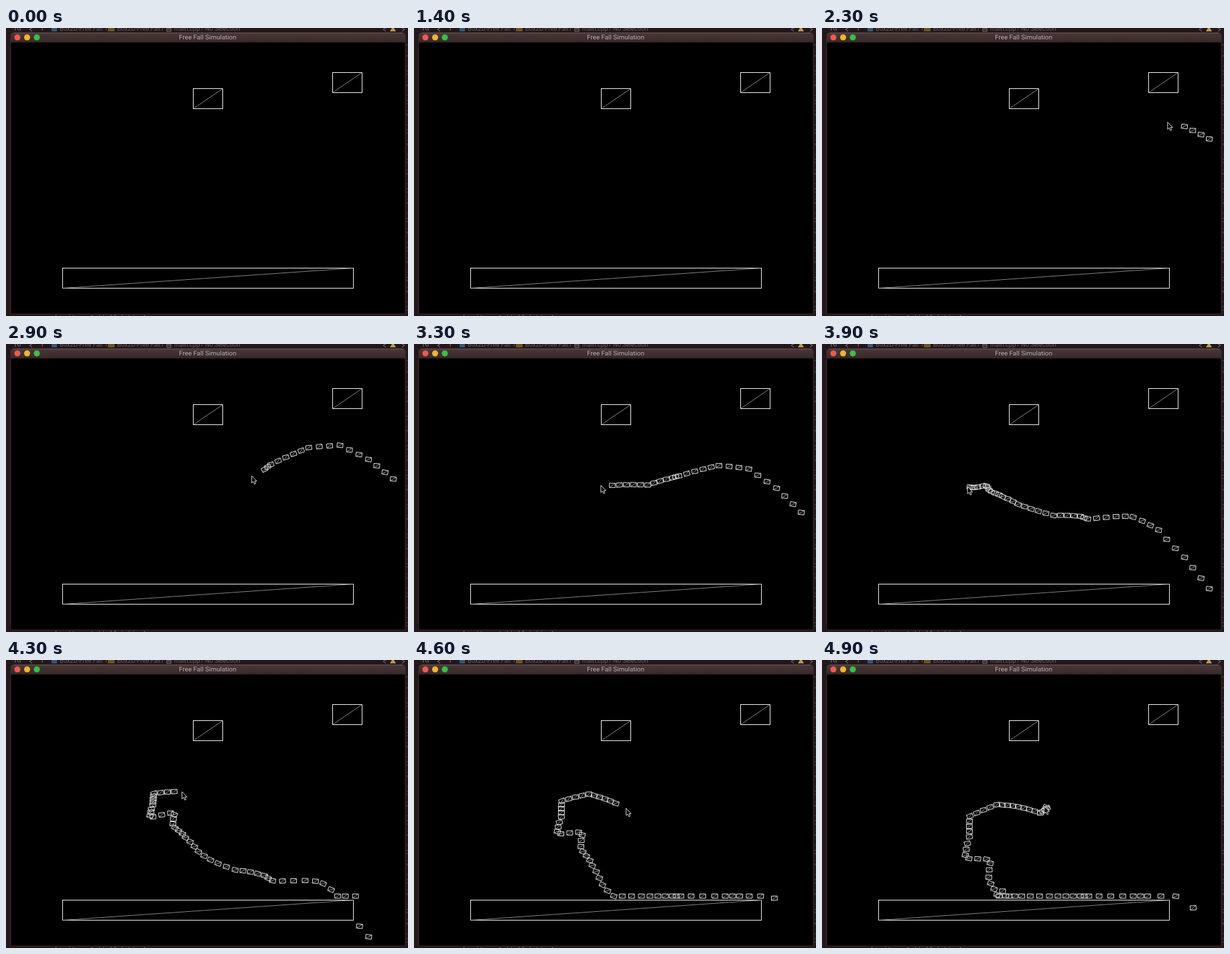
An HTML page that plays this animation: 600 px wide and 430 px high, repeating every 5000 ms.

```html
<!DOCTYPE html>
<html lang="en">
<head>
<meta charset="utf-8">
<title>Free Fall Simulation</title>
<style>
html, body { margin: 0; width: 100%; height: 100%; overflow: hidden; background: #24171a; }
svg { display: block; width: 100%; height: 100%; }
text { font-family: Roboto, Inter, sans-serif; }
.mono { font-family: "Noto Sans Mono", "DejaVu Sans Mono", monospace; }
</style>
</head>
<body>
<svg viewBox="0 0 600 430">
  <defs>
    <linearGradient id="bar" x2="0" y2="1">
      <stop offset="0" stop-color="#483838"/>
      <stop offset="1" stop-color="#382929"/>
    </linearGradient>
  </defs>
  <rect width="600" height="430" fill="#24171a"/>

  <!-- editor behind the window -->
  <g font-size="9.3" fill="#6d6062">
    <path d="M14 0V4M17 0L19 4M21 0V4M39 0L35 2L39 5M53 0L55 2L53 4M567 0L563 2L567 5M591 0L595 2L591 5"
      fill="none" stroke="#85777a"/>
    <rect x="68" width="8" height="5" fill="#31597a"/>
    <rect x="152" width="10" height="5" fill="#6f5420"/>
    <path d="M240 0H246V5H240ZM241 2H245" fill="none" stroke="#85777a"/>
    <path d="M576 0H579L582 5H573Z" fill="#c39a45"/>
    <text x="80" y="4">Box2D-Free Fall</text>
    <text x="148" y="4">/</text>
    <text x="166" y="4">Box2D-Free Fall</text>
    <text x="232" y="4">/</text>
    <text x="251" y="4">main.cpp</text>
    <text x="291" y="4">/</text>
    <text x="297" y="4">No Selection</text>
    <text class="mono" x="70" y="435" fill="#8a7d7f">density: static(friction)</text>
  </g>
  <path d="M598.5 24V426" stroke="#43383a" stroke-width="2" stroke-dasharray="2 9 1 4 3 13 1 6 2 3"/>

  <!-- window -->
  <path d="M7 427V12Q7 7 12 7H591Q596 7 596 12V427Z" fill="#000" stroke="#3a2d2e"/>
  <path d="M7 21.5V12Q7 7 12 7H591Q596 7 596 12V21.5Z" fill="url(#bar)"/>
  <path d="M11 7.5H592" stroke="#665656"/>
  <circle cx="17" cy="14" r="4.5" fill="#f4564f"/>
  <circle cx="31.5" cy="14" r="4.5" fill="#f0b433"/>
  <circle cx="46" cy="14" r="4.5" fill="#36c146"/>
  <text x="301" y="17.4" font-size="9.8" text-anchor="middle" fill="#b9afaf">Free Fall Simulation</text>

  <g fill="none">
    <path d="M279.5 90.5H323.5V120.5H279.5ZM487.5 66.5H531.5V96.5H487.5ZM84.5 358.5H518.5V388.5H84.5Z"
      stroke="#ececec" shape-rendering="crispEdges"/>
    <path d="M279.5 120.5L323.5 90.5M487.5 96.5L531.5 66.5M84.5 388.5L518.5 358.5" stroke="#a2a29a" stroke-width=".8"/>
  </g>
  <path id="boxes" fill="none" stroke="#ededed" stroke-width=".95"/>
  <path id="lines" fill="none" stroke="#b4b4b4" stroke-width=".8"/>
  <path id="cursor" d="M0 0V10.6L2.5 8.5L4.2 12.4L6 11.6L4.4 7.8H7.6Z" fill="#000" stroke="#e6e6e6" stroke-width=".9"/>
</svg>
<script>
const LOOP = 5000, STEP = 100, START = 2140, GAP = 45, LEAD = 1.2;
const FALL = 65, FLOOR = 352.5, EDGE = 526, W = 4.4, H = 3.2;

// pointer path: [box number, x, y]
const trail = [
  [-7, 602, 432], [-4, 587, 386], [0, 578, 164], [3, 541, 147], [6, 498, 136], [9, 451, 147],
  [14, 395, 179], [16, 386, 187], [20, 349, 206], [25, 296, 211], [28, 270, 211], [33, 244, 211],
  [40, 217, 214], [45, 221, 198], [49, 261, 196], [53, 293, 210], [57, 326, 226], [60, 336, 221],
  [63, 331, 218]
];

const $ = id => document.getElementById(id);
const clamp = (v, lo, hi) => Math.max(lo, Math.min(hi, v));
const bump = (i, center, width) => Math.exp(-(((i - center) / width) ** 2));

function pointer(i) {
  const k = clamp(trail.findIndex(p => p[0] >= i), 1, trail.length - 1);
  const [i0, x0, y0] = trail[k - 1], [i1, x1, y1] = trail[k];
  const u = clamp((i - i0) / (i1 - i0), 0, 1);
  return [x0 + (x1 - x0) * u, y0 + (y1 - y0) * u];
}

// Free fall, bent sideways where neighbours push each other, then rest on the slab.
function place(i, t, prev) {
  const age = (t - START - i * GAP) / 1000;
  const [x0, y0] = pointer(i);
  const push = 7.6 * bump(i, 9.7, 3.2) - 9.5 * bump(i, 23.5, 4);
  const wave = 14 * Math.sin((i - 32) * Math.PI / 4) * bump(i, 36, 4) * Math.min(1, 2 * age);
  const pull = FALL - .6 * push;
  const landing = Math.sqrt((FLOOR - y0) / pull);
  let x = x0 + wave + push * Math.min(age, landing) ** 2;
  let y = y0 - .6 * wave + pull * age * age;
  if (y < FLOOR || x >= EDGE) return { x, y };

  // boxes near the end of the slab slide off
  const slide = 18 * Math.max(0, 8 - i);
  x += slide * Math.max(0, age - landing);
  if (x > EDGE + 1) return { x, y: FLOOR + FALL * ((x - EDGE) / slide) ** 2 };
  const onTop = prev && prev.rest && Math.abs(prev.x - x) < 5;
  return { x, y: onTop ? prev.y - 7.5 : FLOOR, rest: true };
}

function tilt(list, i) {
  if (list[i].rest) return 0;
  const a = list[Math.max(0, i - 1)], b = list[Math.min(list.length - 1, i + 1)];
  const turn = Math.sin(2 * Math.atan2(a.y - b.y, a.x - b.x));
  return turn * (i < 7 ? .12 : .4) + .06 * Math.sin(i * 2.3);
}

function draw(t) {
  const list = [];
  for (let i = 0; START + i * GAP <= t; i++) list.push(place(i, t, list[i - 1]));
  let boxes = "", lines = "";
  list.forEach((p, i) => {
    if (p.y > 423) return;
    const r = tilt(list, i), c = Math.cos(r), s = Math.sin(r);
    const at = (x, y) => (p.x + x * c - y * s).toFixed(1) + " " + (p.y + x * s + y * c).toFixed(1);
    boxes += `M${at(-W, -H)}L${at(W, -H)}L${at(W, H)}L${at(-W, H)}Z`;
    lines += `M${at(-W, H)}L${at(W, -H)}`;
  });
  $("boxes").setAttribute("d", boxes);
  $("lines").setAttribute("d", lines);
  const [x, y] = pointer((t - START) / GAP + LEAD);
  $("cursor").setAttribute("transform", `translate(${x.toFixed(1)} ${y.toFixed(1)})`);
}

const begin = performance.now();
function frame() {
  const t = (performance.now() - begin) % LOOP;
  draw(Math.floor(t / STEP) * STEP);
  requestAnimationFrame(frame);
}
frame();
</script>
</body>
</html>
```
